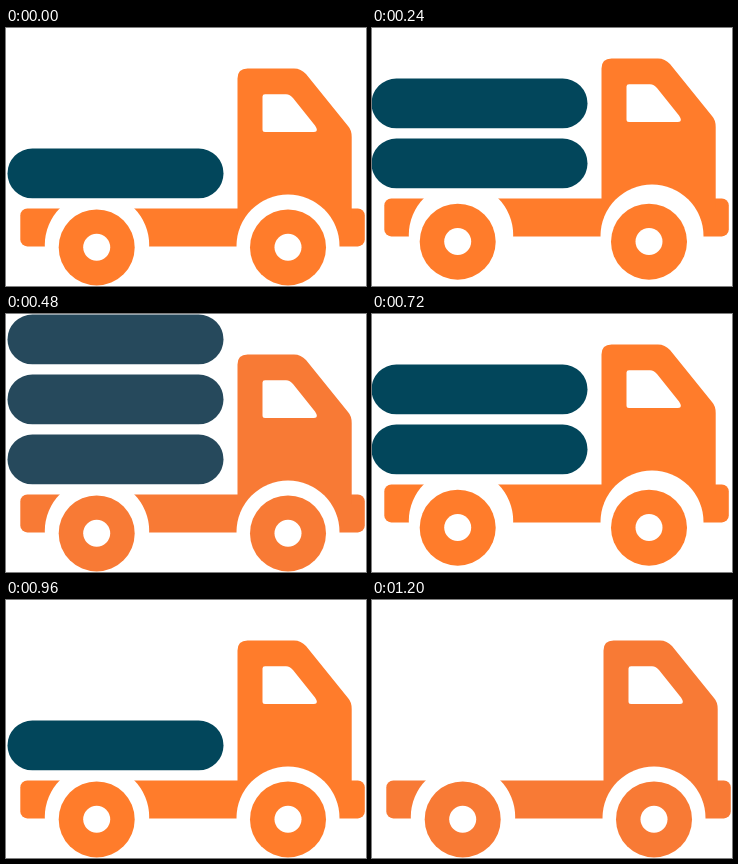
Animation of 360x258 px, one loop 1440 ms. Source, as an HTML page:

```html
<!DOCTYPE html>
<html lang="en">
<head>
<meta charset="utf-8">
<title>Truck loading</title>
<style>
html, body { margin: 0; height: 100%; overflow: hidden; background: #fff; }
svg { display: block; width: 100%; height: 100%; }
.paint { fill: var(--paint); }
.load { fill: var(--load); }
.gap { fill: #fff; }
</style>
</head>
<body>
<svg id="stage" viewBox="0 0 360 258">
  <g id="body">
    <rect class="paint" x="14.3" y="180.4" width="344.5" height="38" rx="7"/>
    <path class="paint" d="M231.5 190V50.5Q231.5 40.4 241.5 40.4H288Q295 40.4 300 46L342 98Q345.700 102 345.700 109V190Z"/>
    <path class="gap" d="M259 66.200H280Q284 66.200 287 70L309 97.500Q313.500 104 308 104H259Q256.500 104 256.500 101.500V68.500Q256.500 66.200 259 66.200Z"/>
    <circle class="gap" cx="91" cy="217" r="52.200"/>
    <circle class="gap" cx="282" cy="218" r="51.500"/>
    <g id="bars" class="load">
      <rect x="1.500" y="120.500" width="216" height="49.800" rx="24.900"/>
      <rect x="1.500" y="60.500" width="216" height="49.800" rx="24.900"/>
      <rect x="1.500" y="0.500" width="216" height="49.800" rx="24.900"/>
    </g>
  </g>
  <g id="wheels">
    <circle class="paint" cx="90.700" cy="219.400" r="38"/>
    <circle class="gap" cx="90.700" cy="219.200" r="13.500"/>
    <circle class="paint" cx="282" cy="219.400" r="38"/>
    <circle class="gap" cx="282" cy="219.200" r="13.500"/>
  </g>
</svg>
<script>
const STEP = 240;
const loads = [1, 2, 3, 2, 1, 0];
const [stage, body, bars, wheels] =
  ["stage", "body", "bars", "wheels"].map(id => document.getElementById(id));

function draw(now) {
  const count = loads[Math.floor(now / STEP) % loads.length];
  const raised = count === 2;
  const muted = count === 3 || count === 0;
  stage.style.setProperty("--paint", muted ? "#f87a35" : "#ff7c2b");
  stage.style.setProperty("--load", muted ? "#26495c" : "#02465b");
  body.setAttribute("transform", raised ? "translate(-2 -10)" : "");
  wheels.setAttribute("transform", raised ? "translate(-5 -5.700)" : "");
  [...bars.children].forEach((bar, i) =>
    bar.setAttribute("visibility", i < count ? "visible" : "hidden"));
}

const start = performance.now();
function loop() {
  draw(performance.now() - start);
  requestAnimationFrame(loop);
}
loop();
</script>
</body>
</html>
```
